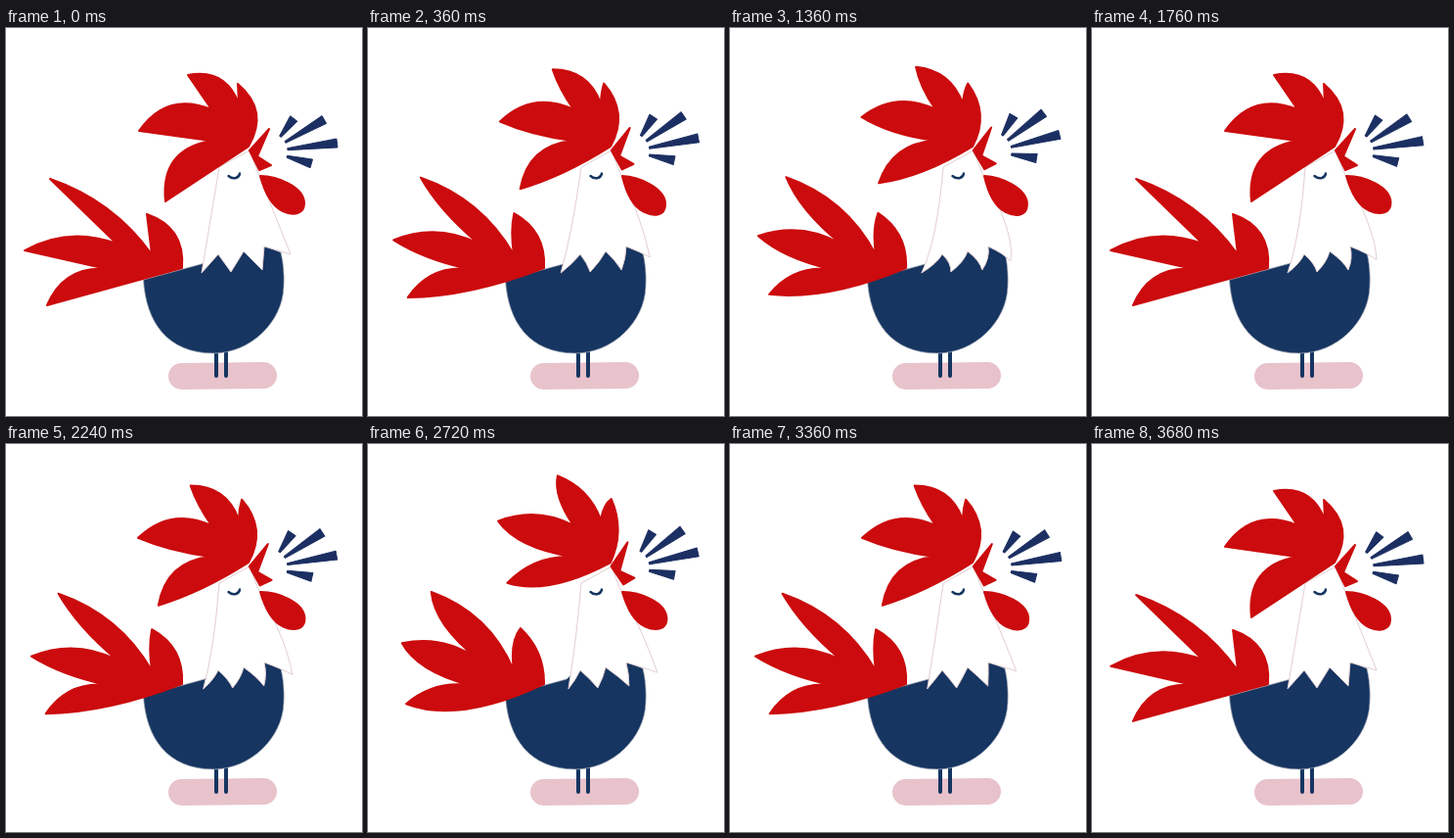
Write an HTML page that moves like this. It is 364x396 px and loops after 3720 ms.

```html
<!DOCTYPE html>
<html lang="en">
<head>
<meta charset="utf-8">
<title>Crowing rooster</title>
<style>
html, body { margin: 0; width: 100%; height: 100%; overflow: hidden; background: #fff; }
svg { display: block; width: 364px; height: 396px; }
.red { fill: #cb0b0d; stroke: #cb0b0d; stroke-width: 2; stroke-linejoin: round; }
.line { fill: none; stroke: #163561; stroke-linecap: round; }
</style>
</head>
<body>
<svg viewBox="0 0 364 396">
  <rect x="166" y="341.5" width="111" height="27" rx="13.5" fill="#e8c3cb" transform="rotate(-.6 221 355)"/>
  <path class="line" stroke-width="4" d="M215 328V355M225 328V355"/>
  <path fill="#163561" stroke="#a9aebb" stroke-width=".7" d="M140.500 257L203 240L217 227L264 222L281 229Q285 245 284 264C283 300 250 332 212 332C165 332 143 300 140.500 257Z"/>
  <path class="red" id="tail"/>
  <path id="neck" fill="#fff" stroke="#e2cdd1" stroke-linejoin="round"/>
  <path class="red" id="wattle" d="M260 151C277 151 305 162 305 179C305 190 294 192 283 187C270 181 264 166 260 151Z"/>
  <path class="red" id="beak" d="M249 125L269 103L257 131L271 140L259 145Z"/>
  <path class="red" id="comb"/>
  <path class="line" stroke-width="2.4" d="M227.500 151Q231 154 235 153Q238.500 152 239 148.500"/>
  <path id="rays" fill="#1c2f62" stroke="#1c2f62" stroke-linejoin="round"/>
</svg>
<script>
const LOOP = 3720, STEP = 40;
const $ = id => document.getElementById(id);
const mix = (a, b, k) => a + (b - a) * k;
const between = (p, q, k) => [mix(p[0], q[0], k), mix(p[1], q[1], k)];

// A feather travels from its low to its high tip; curl is the roundness of its upper edge when low.
const feather = (low, high, curl, notch) => ({ low, high, curl, notch });
const tail = [
  feather([42, 283], [39, 265], .36, [103, 246]),
  feather([19, 227], [35, 203], .23, [113, 220]),
  feather([45, 154], [65, 151], .16, [149, 231]),
  feather([144, 190], [156, 188], .39, [180, 245])
];
const comb = [
  feather([163, 177], [142, 141], .46, [209, 115]),
  feather([136, 105], [133, 78], .40, [210, 83]),
  feather([186, 48], [194, 32], .42, [238, 77]),
  feather([237, 57], [249, 56], .42, [248, 121])
];

// Quadratic edge bowed sideways by a share of its length.
function edge(p, q, bow, lean = 0) {
  const [x, y] = between(p, q, .5 + lean);
  return `Q${x + bow * (q[1] - p[1])} ${y - bow * (q[0] - p[0])} ${q}`;
}

function plume(feathers, lift) {
  let from = feathers.at(-1).notch;
  let d = `M${from}`;
  for (const { low, high, curl, notch } of feathers) {
    const tip = between(low, high, lift);
    d += edge(from, tip, .2 * lift, .15 * lift) + edge(tip, notch, mix(curl, .22, lift));
    from = notch;
  }
  return d + "Z";
}

// Zigzag collar: the tips sway while the notches stay on the body.
const neckTips = [[200, 250], [230, 249], [262, 247], [291, 231]];
const notches = [[217, 231], [243, 228], [264, 223]];
function neck(sway, curl) {
  const tips = neckTips.map(([x, y]) => [x + sway, y]);
  tips[3][1] += 1.4 * curl;
  const bent = (p, q, dx, dy) => {
    const [x, y] = between(p, q, .5);
    return `Q${x + dx * curl} ${y + dy * curl} ${q}`;
  };
  let d = "M218 142" + bent([218, 142], tips[0], 1, 4);
  notches.forEach((notch, i) => {
    d += bent(tips[i], notch, 1, 0) + bent(notch, tips[i + 1], 1, 0);
  });
  return d + bent(tips[3], [257, 146], 4, 3.5) + "L249 125Z";
}

// Sound rays fan out around the beak.
function rays() {
  return [42, 65, 70, 45].map((reach, i) => {
    const angle = (23 * i - 53) * Math.PI / 180;
    const at = (r, side) => [
      269 + r * Math.cos(angle) - side * Math.sin(angle),
      126 + r * Math.sin(angle) + side * Math.cos(angle)
    ];
    return `M${[at(19, -1), at(reach, -4.5), at(reach, 4.5), at(19, 1)]}Z`;
  }).join("");
}

// Eased travel between five key values, with a short hold at the first two turns.
const spans = [[0, 900], [960, 1780], [1880, 2800], [2800, LOOP]];
function ease(t, ...keys) {
  let i = 3;
  while (i && t < spans[i][0]) i--;
  const [from, to] = spans[i];
  const u = Math.min(1, (t - from) / (to - from));
  return mix(keys[i], keys[i + 1], u * u * (3 - 2 * u));
}

const shape = (id, d) => $(id).setAttribute("d", d);
const turn = (id, angle, x, y) => $(id).setAttribute("transform", `rotate(${angle} ${x} ${y})`);

function draw(now) {
  const t = Math.floor(now % LOOP / STEP) * STEP;
  const lift = ease(t, 0, 1, 0, 1, 0);
  shape("comb", plume(comb, lift));
  shape("tail", plume(tail, lift + .4 * lift * (1 - lift)));
  shape("neck", neck(ease(t, 0, -8, 0, 5, 0), ease(t, 0, 6, 4, 1.5, 0)));
  turn("beak", -8 * lift, 248, 128);
  turn("wattle", ease(t, 0, 5, -1, -1, 0), 259, 150);
  turn("rays", -12 * ease(t, 0, 1, .15, .5, 0), 269, 126);
}

shape("rays", rays());
const start = performance.now();
function tick() {
  draw(performance.now() - start);
  requestAnimationFrame(tick);
}
tick();
</script>
</body>
</html>
```
